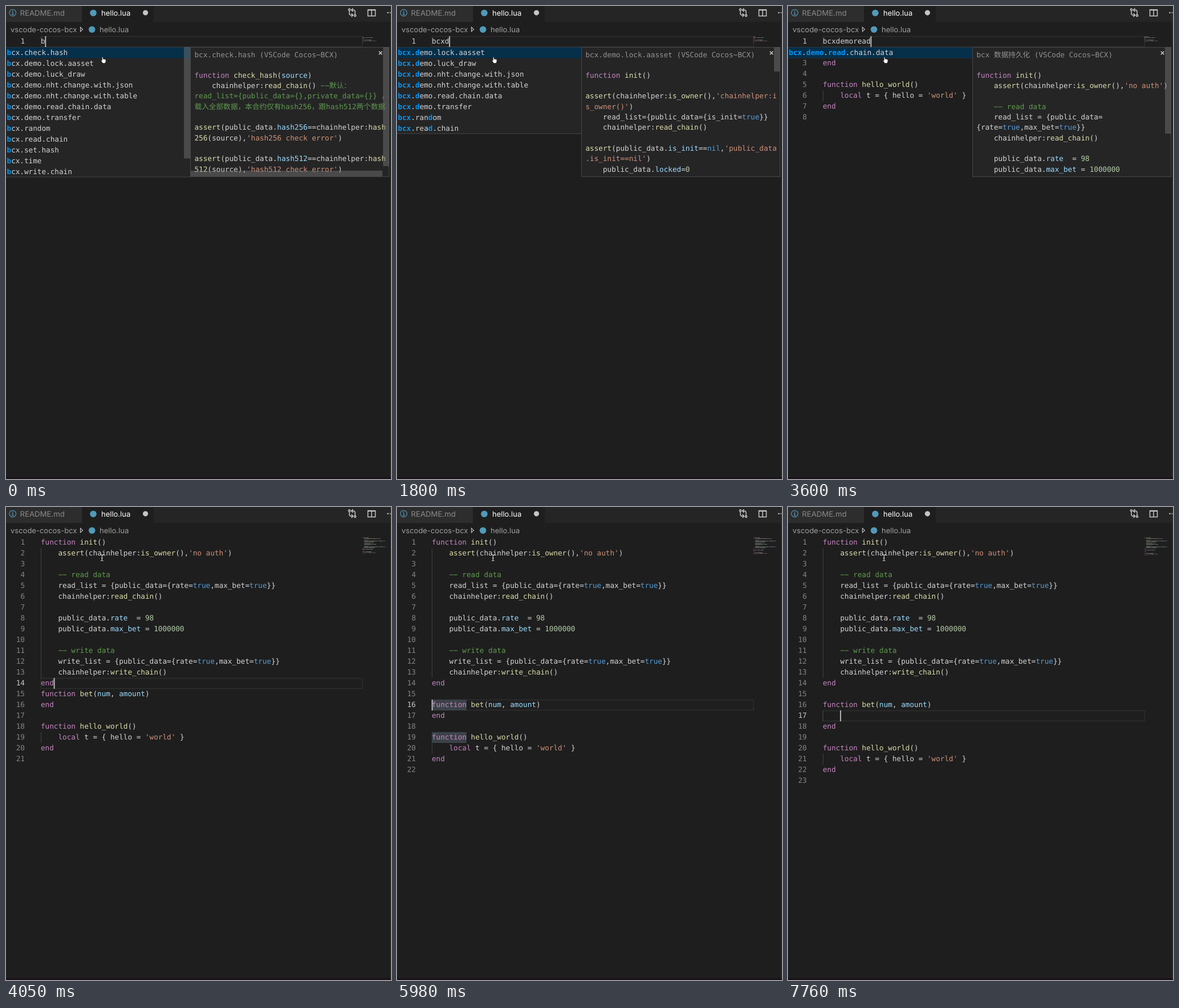
Animation, 675 px wide and 830 px high, one loop 8 s. Source, as an HTML page:

```html
<!DOCTYPE html>
<html lang="en">
<head>
<meta charset="utf-8">
<title>Snippet completion</title>
<style>
  html, body { margin: 0; width: 100%; height: 100%; overflow: hidden; background: #1e1e1e; }
  svg { display: block; }
  text { white-space: pre; fill: #d4d4d4; text-rendering: geometricPrecision; }
  .ui { font: 13px Inter, sans-serif; fill: #a0a0a0; }
  .mono text { font: 12.66px "DejaVu Sans Mono", "Noto Sans CJK SC", "Noto Sans CJK", monospace; }
  .mono .number { fill: #858585; text-anchor: end; }
  .mono .active { fill: #c6c6c6; }
  .mono .title { fill: #929292; }
  .comment { fill: #5f9a4c; }
  .string { fill: #ce9178; }
  .keyword { fill: #c586c0; }
  .constant { fill: #569cd6; }
  .call { fill: #dcdcaa; }
  .property { fill: #9cdcfe; }
  .numeral { fill: #b5cea8; }
  .plain { fill: #d4d4d4; }
  .match { fill: #0097fb; font-weight: bold; }
  .panel { fill: #252526; stroke: #454545; }
  .bar { fill: #797979; fill-opacity: .45; }
  .icon { fill: none; stroke: #c5c5c5; stroke-width: 1.5; }
</style>
</head>
<body>
<svg width="675" height="830" viewBox="0 0 675 830">
  <defs><clipPath id="detail"><path d="M324 72.5H671.5V299H324z"/></clipPath></defs>
  <rect width="675" height="830" fill="#1e1e1e"/>
  <rect width="675" height="28" fill="#252526"/>
  <rect width="133" height="28" fill="#2d2d2d"/>
  <rect x="133" width="126" height="28" fill="#1e1e1e"/>
  <g fill="none" stroke="#519aba" stroke-width="1.2">
    <circle cx="11.7" cy="11.8" r="5.8"/>
    <path d="M10.3 10.5h1.6v4.3m-1.8 0h3.6M11 8.3h1.4"/>
  </g>
  <text class="ui" x="24.5" y="16.5" style="font-size:13.2px;fill:#8b8b8b">README.md</text>
  <circle cx="153" cy="12.2" r="5.8" fill="#519aba"/>
  <text class="ui" x="167" y="16.5" style="fill:#fff">hello.lua</text>
  <circle cx="244.5" cy="11.8" r="4.6" fill="#c5c5c5"/>
  <text class="ui" x="8" y="45.5">vscode-cocos-bcx</text>
  <path d="M130.5 37.2v7.6l4-3.8z" class="icon" style="stroke-width:1.1"/>
  <circle cx="150.7" cy="41.2" r="5.8" fill="#519aba"/>
  <text class="ui" x="164" y="45.5">hello.lua</text>
  <g class="icon">
    <path d="M602 8v5q0 3 3 3h3m-2.5-3 3 3-3 3M612 15v-5q0-3-3-3h-3m2.5 3-3-3 3-3"/>
    <circle cx="602" cy="6.4" r="1.6"/><circle cx="612" cy="16.8" r="1.6"/>
    <path d="M634.5 6.5h13v11h-13zM641 6v11M634 7.2h14"/>
  </g>
  <g fill="#c5c5c5"><circle cx="669.5" cy="11.8" r="1.3"/><circle cx="674" cy="11.8" r="1.3"/></g>
  <g id="editor" class="mono"></g>
  <path d="M674.5 0v830" stroke="#303030"/>
  <rect y="827" width="675" height="3" fill="#1a1219"/>
</svg>
<script>
const LOOP = 8000, CHAR = 7.62, ROW = 19, TOP = 53, LEFT = 61, LIST_TOP = 72, MAX_ROWS = 12;

const snippet = [
  'function init()',
  "    assert(chainhelper:is_owner(),'no auth')",
  '',
  '    −− read data',
  '    read_list = {public_data={rate=true,max_bet=true}}',
  '    chainhelper:read_chain()',
  '',
  '    public_data.rate  = 98',
  '    public_data.max_bet = 1000000',
  '',
  '    −− write data',
  '    write_list = {public_data={rate=true,max_bet=true}}',
  '    chainhelper:write_chain()',
  'end'
];
const betHead = 'function bet(num, amount)';
const rest = ['end', '', 'function hello_world()', "    local t = { hello = 'world' }", 'end', ''];
const inserted = [...snippet, betHead, ...rest];
const spaced = [...snippet, '', betHead, ...rest];
const opened = [...snippet, '', betHead, '    ', ...rest];

const items = ['check.hash', 'demo.lock.aasset', 'demo.luck_draw', 'demo.nht.change.with.json',
  'demo.nht.change.with.table', 'demo.read.chain.data', 'demo.transfer', 'random', 'read.chain',
  'set.hash', 'time', 'write.chain'].map(name => 'bcx.' + name);
const totals = { b: 14, bc: 13 };

// Lines led by # continue a comment, lines led by ~ continue a string.
const hashCheck = bits => [
  `assert(public_data.hash${bits}==chainhelper:hash`,
  `${bits}(source),'hash${bits} check error')`
];
const details = {
  'bcx.check.hash': { title: 'bcx.check.hash', bar: 209, wide: true, lines: [
    'function check_hash(source)',
    '    chainhelper:read_chain() −−默认：',
    '#read_list={public_data={},private_data={}} ，',
    '#载入全部数据，本合约仅有hash256，跟hash512两个数据',
    '', ...hashCheck(256), '', ...hashCheck(512)] },
  'bcx.demo.lock.aasset': { title: 'bcx.demo.lock.aasset', bar: 43, lines: [
    'function init()', '',
    "assert(chainhelper:is_owner(),'chainhelper:i", "~s_owner()')",
    '    read_list={public_data={is_init=true}}',
    '    chainhelper:read_chain()', '',
    "assert(public_data.is_init==nil,'public_data", "~.is_init==nil')",
    '    public_data.locked=0'] },
  'bcx.demo.read.chain.data': { title: 'bcx 数据持久化', bar: 152, lines: [
    ...snippet.slice(0, 4),
    '    read_list = {public_data=', '{rate=true,max_bet=true}}',
    ...snippet.slice(5, 9)] }
};

const typing = (at, query, more) =>
  ({ at, query, lines: [query, betHead, ...rest], row: 0, col: query.length, ...more });
const editing = (at, lines, row, col, more) => ({ at, lines, row, col, ...more });
const steps = [
  typing(0, 'b'), typing(300, 'b', { blink: true }),
  typing(900, 'bc'), typing(1050, 'bc'), typing(1200, 'bc'), typing(1350, 'bc'),
  typing(1500, 'bcx'), typing(1800, 'bcxd'), typing(1950, 'bcxde'), typing(2100, 'bcxdem'),
  typing(2400, 'bcxdemo'), typing(2850, 'bcxdemor'), typing(3300, 'bcxdemore'),
  typing(3600, 'bcxdemoread'),
  editing(4050, inserted, 13, 3), editing(4650, inserted, 13, 3, { blink: true }),
  editing(4800, inserted, 14, 3), editing(5100, inserted, 14, 3, { marks: [14, 17] }),
  editing(5240, inserted, 13, 3),
  editing(5540, spaced, 14, 0), editing(5690, spaced, 15, 0),
  editing(5980, spaced, 15, 0, { marks: [15, 18] }), editing(6130, spaced, 15, 25),
  editing(6570, opened, 16, 4), editing(7320, opened, 16, 4, { blink: true }),
  editing(7760, opened, 16, 4)
];

const rules = [
  ['comment', '−−.*'], ['string', "'[^']*'?"],
  ['keyword', '\\b(?:function|local|end)\\b'], ['constant', '\\b(?:true|nil)\\b'],
  ['property', '(?<=^function \\w+\\([^)]*)\\w+|(?<=\\.)\\w+'],
  ['call', '\\w+(?=\\()|(?<=:)\\w+'], ['numeral', '\\b\\d+\\b'],
  ['plain', '\\w+|\\s+|[^\\w\\s]']
];
const lexer = new RegExp(rules.map(([kind, body]) => `(?<${kind}>${body})`).join('|'), 'g');

function tokens(line) {
  if (line[0] === '#') return [['comment', line.slice(1)]];
  if (line[0] === '~') {
    const close = line.indexOf("'") + 1;
    return [['string', line.slice(1, close)], ['plain', line.slice(close)]];
  }
  return [...line.matchAll(lexer)].map(m =>
    [Object.keys(m.groups).find(kind => m.groups[kind] !== undefined), m[0]]);
}

const rect = (x, y, w, h, attrs) => `<rect x="${x}" y="${y}" width="${w}" height="${h}" ${attrs}/>`;
const text = (x, y, body, kind = '') => `<text x="${x}" y="${y}" class="${kind}">${body}</text>`;
const span = ([kind, body]) => `<tspan class="${kind}">${body}</tspan>`;
const codeLine = (x, y, line) => text(x, y, tokens(line).map(span).join(''));

function fuzzy(name, query) {
  const hits = [];
  let from = 0;
  for (const letter of query) {
    const hit = name.indexOf(letter, from);
    if (hit < 0) return null;
    hits.push(hit);
    from = hit + 1;
  }
  return { name, hits };
}

function minimap(lines) {
  return lines.map((line, row) => {
    let col = 0;
    return tokens(line).map(([kind, body]) => {
      const x = 625 + col * .73;
      col += body.length;
      return body.trim() ? rect(x, 53.5 + row * 1.45, body.length * .73, .9, `class="${kind}" opacity=".5"`) : '';
    }).join('');
  }).join('');
}

function code({ lines, row, col, blink, marks = [] }) {
  const y = i => TOP + i * ROW;
  const indented = i => {
    while (i < lines.length - 1 && !lines[i]) i++;
    return lines[i].startsWith(' ');
  };
  return rect(LEFT, y(row) + .5, 564, ROW - 1, 'fill="none" stroke="#2e2e2e" stroke-width="1.5"')
    + marks.map(i => rect(LEFT, y(i), 8 * CHAR, ROW, 'fill="#3c4249"')).join('')
    + lines.map((line, i) =>
        text(33, y(i) + 13.4, i + 1, i === row ? 'number active' : 'number')
        + (indented(i) ? rect(LEFT, y(i), 1, ROW, 'fill="#404040"') : '')
        + codeLine(LEFT, y(i) + 13.4, line)).join('')
    + (blink ? '' : rect(LEFT + col * CHAR - .2, y(row), 1.8, ROW, 'fill="#c4c5c3"'))
    + minimap(lines);
}

function suggestions(query) {
  const found = items.map(name => fuzzy(name, query)).filter(Boolean)
    .sort((a, b) => a.hits.at(-1) - b.hits.at(-1));
  const height = found.length * ROW;
  const total = totals[query] || found.length;
  const rows = found.map(({ name, hits }, i) => text(1.5, LIST_TOP + 14 + i * ROW,
    [...name].map((c, k) => hits.includes(k) ? span(['match', c]) : c).join('')));
  const markup = rect(-1, LIST_TOP + .5, 324.5, height - .5, 'class="panel"')
    + rect(0, LIST_TOP + .5, 323, ROW, 'fill="#062f4a"')
    + rows.join('')
    + (total > MAX_ROWS ? rect(312, LIST_TOP, 11, 228 * MAX_ROWS / total, 'class="bar"') : '');
  return { top: found[0].name, markup };
}

function detail({ title, lines, bar, wide }, at) {
  const fade = wide ? Math.min(1, Math.max(0, (1320 - at) / 500)) : 0;
  return rect(323.5, LIST_TOP + .5, 348, 227, 'class="panel"')
    + '<g clip-path="url(#detail)">'
    + text(330.5, 90, `${title} (VSCode Cocos−BCX)`, 'title')
    + lines.map((line, i) => codeLine(330.5, 125.6 + i * 18.33, line)).join('')
    + rect(661, LIST_TOP, 11, bar, 'class="bar"')
    + rect(324, 289, 336, 10, `class="bar" opacity="${fade}"`)
    + '</g><path d="M653.8 79.5l5.6 5.6m0-5.6l-5.6 5.6" class="icon" stroke-width="1.8"/>';
}

const hand = '<path d="M168.2 96v-5.6q1-1.6 2 0v2.7q1-.7 1.7.2 1-.5 1.6.4 1.4-.4 1.6.8v2.6l-1.2 3.4h-4.3l-3.3-4.8q.5-1.3 1.9.3z" fill="#fff" stroke="#111" stroke-width=".7"/>';
const beam = '<path d="M166 83.5q2.3 0 2.3 1.5v8q0 1.5-2.3 1.5m4.6-11q-2.3 0-2.3 1.5m0 8q0 1.5 2.3 1.5m-3.6-4.7h2.6" class="icon" style="stroke:#e4e4e4;stroke-width:1"/>';

function scene(step) {
  if (!step.query) return code(step) + beam;
  const list = suggestions(step.query);
  return code(step) + list.markup + detail(details[list.top], step.at) + hand;
}

const editor = document.getElementById('editor');
let shown;
function tick(now) {
  const time = now % LOOP;
  const step = steps.findLast(s => s.at <= time) || steps[0];
  if (step !== shown) editor.innerHTML = scene(shown = step);
  requestAnimationFrame(tick);
}
tick(0);
</script>
</body>
</html>
```
